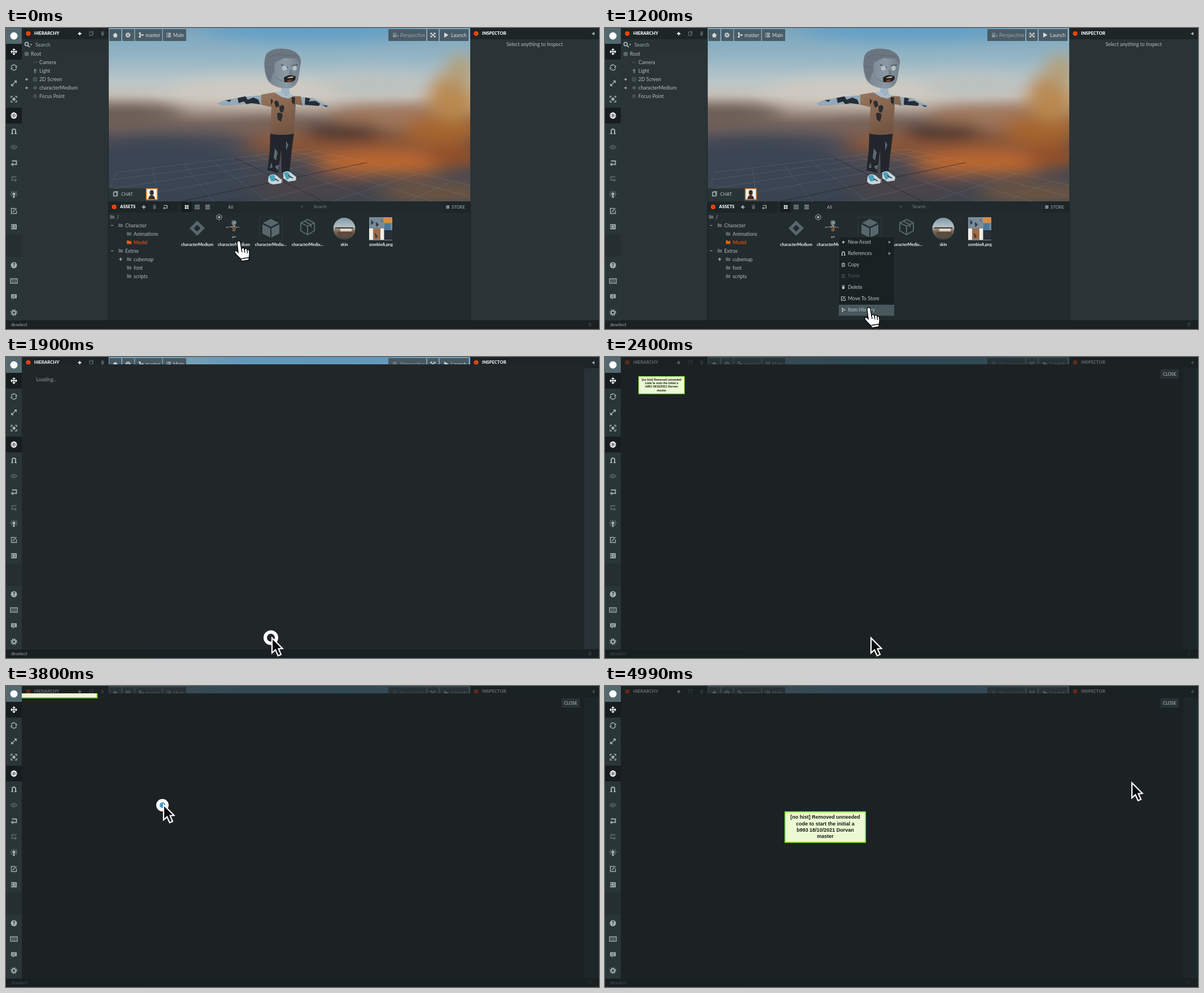
Recreate the animation shown at these times as an HTML page. Size 1050x533 px, loop 5090 ms.

```html
<!DOCTYPE html>
<html lang="en">
<head>
<meta charset="utf-8">
<title>Editor item history</title>
<style>
  html, body { margin: 0; width: 100%; height: 100%; overflow: hidden; background: #1b2224; }
  svg { display: block; width: 100%; height: 100%; }
  text { font-family: Lato, "Open Sans", sans-serif; }
  .node text { font: bold 9px "Liberation Sans", Arial, sans-serif; }
  .icon { fill: none; stroke: currentColor; stroke-width: 1.4; }
  .solid { fill: currentColor; stroke: none; }
</style>
</head>
<body>
<svg id="stage" viewBox="0 0 1050 533"></svg>
<script>
const LOOP = 5090;
const LIGHT = '#a3afb2', DIM = '#59666a', WHITE = '#f2f5f5', ORANGE = '#ff5a0a';

const rect = (x, y, w, h, fill, extra = '') =>
  `<rect x="${x}" y="${y}" width="${w}" height="${h}" fill="${fill}" ${extra}/>`;
const path = (d, fill, extra = '') => `<path d="${d}" fill="${fill}" ${extra}/>`;
const ellipse = (x, y, rx, ry, fill, extra = '') =>
  `<ellipse cx="${x}" cy="${y}" rx="${rx}" ry="${ry}" fill="${fill}" ${extra}/>`;
const text = (x, y, s, { fill = LIGHT, size = 8.8, weight = 400, anchor = 'start' } = {}) =>
  `<text x="${x}" y="${y + size * 0.35}" fill="${fill}" font-size="${size}" font-weight="${weight}" text-anchor="${anchor}">${s}</text>`;
const group = (id, body, extra = '') => `<g id="${id}" ${extra}>${body}</g>`;

// Icons are centred on 0,0 in a box of about 12 units.
const ICONS = {
  move: '<path d="M-5 0H5M0-5V5" /><path class="solid" d="M-6 0l3-3v6zM6 0l-3-3v6zM0-6l3 3h-6zM0 6l3-3h-6z"/>',
  refresh: '<path d="M-4.5-1A4.6 4.6 0 0 1 4-2.5M4.5 1A4.6 4.6 0 0 1-4 2.5"/><path class="solid" d="M5.5-4v4H1.8zM-5.5 4V0h3.7z"/>',
  resize: '<path d="M-4 4L4-4"/><path class="solid" d="M5-5v5L0-5zM-5 5V0l5 5z"/>',
  frame: '<path d="M-5-2v-3h3M2-5h3v3M5 2v3H2M-2 5h-3V2"/><rect class="solid" x="-2.5" y="-2.5" width="5" height="5"/>',
  globe: '<circle r="4.8"/><ellipse rx="2.2" ry="4.8"/><path d="M-5 0H5M-4-2.6H4M-4 2.6H4" stroke-width=".9"/>',
  magnet: '<path d="M-3 5V-1A3 3 0 0 1 3-1V5" stroke-width="2"/><path d="M-5 4h4M1 4h4"/>',
  eye: '<path d="M-5.5 0Q0-6.5 5.5 0Q0 6.5-5.5 0z"/><circle class="solid" r="1.7"/>',
  undo: '<path d="M-3.5-3.5h8v6h-6" stroke-width="1.8"/><path class="solid" d="M-5.5 2.5l4-3.2v6.4z"/>',
  redo: '<path d="M4.5-3.5h-8v6h5" stroke-width="1.8"/><path class="solid" d="M5.5 2.5l-4-3.2v6.4z"/>',
  bulb: '<circle class="solid" cy="-1" r="2.7"/><path class="solid" d="M-1.5 2h3v4h-3z"/><path d="M-6-1h1.7M4.3-1H6M-4.5-5l1 1M4.5-5l-1 1M0-6v1.2M-4.5 3l1-1M4.5 3l-1-1"/>',
  light: '<circle class="solid" cy="-1.5" r="3"/><path class="solid" d="M-1.5 1h3v4h-3z"/>',
  edit: '<path d="M2-4.5h-6.5v9h9V-1M-2 2l6.5-7"/>',
  outbox: '<path class="solid" d="M-5-4.5H5v2.2H-5zM-5 2.3H5v2.2H-5zM3-3h2v6H3zM-5-1h4v-2l4 3-4 3V1h-4z"/>',
  help: '<circle class="solid" r="5.5"/><text y="3.2" text-anchor="middle" font-size="9" font-weight="900" fill="#263033" stroke="none">?</text>',
  keyboard: '<rect x="-6" y="-4" width="12" height="8"/><path d="M-4-1.5H4M-4 1.5H4" stroke-dasharray="1.4 .8"/>',
  chat: '<path class="solid" d="M-5-4.5H5v7H0L-2 5V2.5h-3z"/><path d="M-3-2H3M-3 .5H2" stroke="#263033" stroke-width=".8"/>',
  gear: '<circle r="3" stroke-width="2"/><circle r="5" stroke-width="1.7" stroke-dasharray="2 1.93"/>',
  plus: '<path d="M-3.3 0H3.3M0-3.3V3.3" stroke-width="2"/>',
  minus: '<path d="M-2.6 0H2.6"/>',
  copy: '<rect x="-3" y="-3" width="5" height="6"/><path d="M-1-4h4.5v6" stroke-width=".8"/>',
  trash: '<path class="solid" d="M-3-2h6l-.5 6h-5zM-3.7-4h7.4v1.2h-7.4zM-1.2-5h2.4v1h-2.4z"/>',
  search: '<circle cx="-1" cy="-1" r="3" stroke-width="1.8"/><path d="M1 1l3.5 3.5" stroke-width="2"/>',
  home: '<path class="solid" d="M-4.5 .2L0-4 4.5 .2H3V4H-3V.2z"/>',
  branch: '<path d="M-2-3v6M-2 0h4" /><path class="solid" d="M-3.7-4.5h3.4v2.5h-3.4zM-3.7 2h3.4v2.5h-3.4zM1.5-1.3h3v2.6h-3z"/>',
  list: '<path d="M-1.5-3H4M-1.5 0H4M-1.5 3H4M-4-3h1.4M-4 0h1.4M-4 3h1.4"/>',
  play: '<path class="solid" d="M-3-4.5L4.5 0-3 4.5z"/>',
  camera: '<path class="solid" d="M-5-1h6v5h-6zM1.5 1.5L5-.5v4zM-4.5-4h2.4v2.3h-2.4zM-1-4h2.4v2.3H-1z"/>',
  expand: '<path class="solid" d="M-4.5-4h3.5l-3.5 3.5zM4.5-4H1l3.5 3.5zM-4.5 4H-1L-4.5 .5zM4.5 4H1L4.5 .5z"/><path d="M-3.5-3l7 6M3.5-3l-7 6"/>',
  folder: '<path class="solid" d="M-4-3.2h3l1 1h4V3h-8z"/>',
  tiles: '<path class="solid" d="M-3.3-3.3h2.9v2.9h-2.9zM.4-3.3h2.9v2.9H.4zM-3.3 .4h2.9v2.9h-2.9zM.4 .4h2.9v2.9H.4z"/>',
  dots: '<path d="M-4-3H4M-4 0H4M-4 3H4" stroke-width="1.9" stroke-dasharray="2 1"/>',
  rows: '<path d="M-4-3H4M-4 0H4M-4 3H4"/>',
  diamond: '<path d="M0-3.2L3.2 0 0 3.2-3.2 0z"/>',
  code: '<path d="M-1.5-2L-3.5 0-1.5 2M1.5-2L3.5 0 1.5 2" stroke-width=".9"/>',
  screen: '<path d="M-4-4h8v8h-8zM-2-2h4v4h-4z" stroke-width=".8"/>',
  target: '<circle r="3.8" stroke-width=".8"/><circle r="1.5" stroke-width=".8"/>',
  hexagon: '<path d="M0-4.6l4 2.3v4.6l-4 2.3-4-2.3v-4.6z" stroke-width=".9"/><circle class="solid" r="2"/>',
  clip: '<path d="M-3-3h6v7h-6zM-1.5-4h3"/><path d="M0-1v4M-1.5 1h3" stroke-width=".9"/>'
};
const icon = (name, x, y, color = LIGHT, scale = 1) =>
  `<g class="icon" color="${color}" transform="translate(${x} ${y}) scale(${scale})">${ICONS[name]}</g>`;
const dot = (x, y) => `<circle cx="${x}" cy="${y}" r="4" fill="#ff4a05"/><circle cx="${x}" cy="${y}" r="1" fill="#7b2100"/>`;
const heading = (x, y, s) => dot(x - 10.5, y) + text(x, y, s, { size: 7.7, weight: 900, fill: WHITE });

function backdrop() {
  const blobs = [
    [540, 0, 190, 20, '#619fc7'], [450, 112, 160, 22, '#cfcac1'], [650, 100, 90, 18, '#bcc1be'],
    [205, 152, 110, 17, '#65564f'], [480, 176, 90, 14, '#7c6457'],
    [700, 158, 130, 20, '#a1775a'], [610, 206, 190, 24, '#8d5637'], [775, 180, 70, 26, '#a5652f'],
    [790, 122, 42, 44, '#b9884f'], [806, 78, 24, 34, '#b39c74'], [600, 184, 70, 15, '#45332f'],
    [670, 240, 125, 20, '#bd672d'], [795, 226, 50, 22, '#93502b'], [765, 292, 110, 20, '#6d5443'],
    [540, 284, 110, 24, '#484448'], [270, 250, 150, 50, '#3b4552']
  ];
  return rect(181, 0, 641, 307, 'url(#sky)') +
    `<g filter="url(#soft)">${blobs.map(b => ellipse(...b)).join('')}</g>`;
}

function floorGrid() {
  const project = (u, v) => {
    const depth = 1 + 0.364 * u + 0.5 * v;
    return `${(502 + (203 * u - 130 * v - 15) / depth).toFixed(1)} ${(150 + 120 / depth).toFixed(1)}`;
  };
  let pale = '', axes = '';
  for (let i = -4; i <= 4; i++) {
    const k = i / 4;
    const lines = `M${project(k, -1)}L${project(k, 1)}M${project(-1, k)}L${project(1, k)}`;
    if (i) pale += lines; else axes = lines;
  }
  return path(pale, 'none', 'stroke="#a5b2bc" stroke-opacity=".2" stroke-width=".8"') +
    path(axes, 'none', 'stroke="#191f25" stroke-opacity=".6"');
}

function figure() {
  const skin = '#94a9b9', ink = '#262c34';
  return path('M488 103h13l2 18-16-3z', '#9fb4c3') +
    path('M452 119L420 122 390 127 374 133 381 138 398 137 422 135 452 136z', skin) +
    path('M521 122l23 2 14 7 15 6-3 4-17-4-31 1z', skin) +
    path('M410 124l14-3 4 6 10-4 9 4 3 8-16-2-8 2-5-5-9 3zM389 128l10-1-3 4zM530 123l9 2-3 5 12-1 8 5-2 4-25-2zM560 136l10 2-3 2z', ink) +
    path('M468 184l42 1-5 40-3 29-14 2-1-40-5 41-19-5 4-35z', '#22262c') +
    path('M476 213l5 7-3 15-4-5zM496 200l4 7-4 10zM484 242l-3 10-5-7zM470 238l2 9-5 1z', '#5d6a75') +
    path('M452 118l23-4 25 6 22 1 3 16-12-2-3 52c-14 3-30 3-42 0l2-47-18-4z', 'url(#shirt)') +
    path('M475 114l13-1 8 7 7-4 7 4-10 5-12-3z', '#a9bdca') +
    path('M475 132q3-6 7-2l2 8-6 3zM484 139q7-6 9 2l-3 9-5-2zM480 151q7-3 10 3l-3 12-6-4zM506 122l6 1-1 13-5-4zM469 125l4 4-4 8z', '#2b2c2f') +
    path('M459 52C462 38 480 35 495 37 512 39 523 48 522 62L518 88C516 101 508 108 494 107 478 106 466 99 462 90 457 77 456 63 459 52z', 'url(#face)') +
    path('M459 52C462 38 480 35 495 37 512 39 523 48 522 64L515 55 493 53 476 61 475 78 471 85 468 95C459 86 456 63 459 52z', '#6a7580') +
    path('M464 53l13-6 36 3M460 68l9 2M476 85q12 14 36 11', 'none', 'stroke="#4f5b65" stroke-opacity=".6"') +
    path('M487 65l12 5M506 67l11-2', 'none', 'stroke="#535d65" stroke-width="2"') +
    ellipse(493, 71, 4.4, 4.4, '#b4bfc5') + ellipse(511, 71, 3.8, 4.2, '#b4bfc5') +
    path('M502 74l4 0 2 8-6 0z', '#6f7d87') +
    path('M492 88q10-8 21-2l-1 6-5 3-14 1z', '#24201f') + path('M498 88q7-3 11-2l-1 2-9 1z', '#c4beae') +
    path('M497 93l8-2 2 2-7 2z', '#84452f') +
    path('M465 263q5-7 14-2l9 8-1 6-13 2q-9-1-10-6zM491 256q7-5 13 0l10 8-1 6-13 2-9-6z', '#c9d6da') +
    path('M466 263q4-5 9-2l3 9-8 2zM492 257q5-4 9 0l3 8-7 4z', '#45a2bb') +
    path('M476 267l7 4M500 261l8 5', 'none', 'stroke="#333b40" stroke-width="1.5"');
}

function viewport() {
  const button = (x, w, body) => rect(x, 2, w, 21, '#46565e', 'fill-opacity=".92"') + body;
  const label = { fill: '#d6dddf', size: 8.7 };
  return backdrop() + floorGrid() + figure() +
    path('M485 268h4v5h-4z', 'none', 'stroke="#d8dde0" stroke-width=".8"') +
    button(183, 21, icon('home', 193.5, 12.5, '#d6dddf')) +
    button(206, 21, icon('gear', 216, 12.5, '#d6dddf', .8)) +
    button(228.5, 48, icon('branch', 239, 12.5, '#d6dddf') + text(247, 12.5, 'master', label)) +
    button(278, 41, icon('list', 288, 12.5, '#d6dddf') + text(296, 12.5, 'Main', label)) +
    button(677, 67, icon('camera', 690, 12.5, '#859398') + text(698, 12.5, 'Perspective', { ...label, fill: '#98a5aa' })) +
    button(746, 20, icon('expand', 756, 12.5, '#d6dddf')) +
    button(768, 51, icon('play', 779, 12.5, '#d6dddf') + text(788, 12.5, 'Launch', label)) +
    rect(182, 284, 65, 23, '#293437') + icon('copy', 194, 294, LIGHT, 1.15) + text(204, 294, 'CHAT', { size: 7.8, fill: '#c1cacc' }) +
    rect(248.7, 284.7, 19, 19, '#f5f1e9', 'stroke="#f38a25" stroke-width="1.5"') +
    ellipse(258, 291.5, 3.6, 4.5, '#34302f') + path('M252 303q1-7 6-7t6 7z', '#34302f');
}

function toolbar() {
  const items = [['move', 42], ['refresh', 70], ['resize', 98], ['frame', 126], ['globe', 155], ['magnet', 183],
    ['eye', 211], ['undo', 239], ['redo', 267], ['bulb', 295], ['edit', 324], ['outbox', 352],
    ['help', 420], ['keyboard', 448], ['chat', 476], ['gear', 504]];
  const active = ['move', 'globe'], off = ['eye', 'redo'];
  return rect(0, 0, 28, 518, '#2a3538') + rect(0, 366, 28, 39, '#252e31') + rect(0, 0, 28, 28, '#53696f') +
    '<circle cx="14" cy="14" r="6.5" fill="#fff"/>' +
    items.map(([name, y]) => (active.includes(name) ? rect(0, y - 14, 28, 28, '#171d1f') : '') +
      icon(name, 14, y, active.includes(name) ? '#fff' : off.includes(name) ? DIM : LIGHT)).join('');
}

function hierarchy() {
  const rows = [['code', 'Camera'], ['light', 'Light'], ['screen', '2D Screen', 1], ['diamond', 'characterMedium', 1], ['target', 'Focus Point']];
  return rect(28, 0, 153, 518, '#2a3437') + rect(28, 0, 153, 20, '#1d2527') + rect(28, 20, 153, 18, '#283235') +
    heading(50, 9.7, 'HIERARCHY') + icon('plus', 130.5, 10, WHITE, .9) + icon('copy', 151, 10, DIM) + icon('trash', 171, 10, DIM, .8) +
    icon('search', 37.5, 29.5, LIGHT) + path('M42.5 28.5h4l-2 2.5z', LIGHT) + text(52, 29.5, 'Search', { size: 9 }) +
    ellipse(36.5, 46, 4, 4, '#5a686c') + text(44, 46, 'Root', { fill: '#b3bdbf' }) +
    rows.map(([name, label, open], i) => {
      const y = 61 + i * 15;
      return icon(name, 51.5, y, '#6c7b7f', .8) + text(59, y, label, { fill: '#b3bdbf' }) + (open ? icon('plus', 36.5, y, LIGHT, .7) : '');
    }).join('');
}

function inspector() {
  return rect(822, 0, 228, 518, '#2a3437') + rect(822, 0, 228, 20, '#1d2527') + heading(843, 9.7, 'INSPECTOR') +
    path('M1042 7v6l-5-3z', LIGHT) + text(936, 28.5, 'Select anything to Inspect', { anchor: 'middle', fill: '#b3bdbf' });
}

function assets() {
  const tree = [['/', 188, 335], ['Character', 203, 350, 'minus'], ['Animations', 218, 365], ['Model', 218, 380],
    ['Extras', 203, 395, 'minus'], ['cubemap', 218, 410, 'plus'], ['font', 218, 425], ['scripts', 218, 440]];
  const names = ['characterMedium', 'characterMedium', 'characterMediu...', 'characterMediu...', 'skin', 'zombieA.png'];
  const tone = '#58676b';
  const art =
    path('M338.5 341l13.5 13.5-13.5 13.5-13.5-13.5zM338.5 348.5l-6 6 6 6 6-6z', tone, 'fill-rule="evenodd"') +
    `<g transform="translate(341 336) scale(.128)">${figure()}</g>` +
    rect(448.5, 335, 41, 41, 'none', 'stroke="#3a4649" stroke-dasharray="2 1.5"') +
    path('M469 338l14 7-14 7-14-7zM454 347.5l14 7V371l-14-7zM484 347.5l-14 7V371l14-7z', tone) +
    path('M534 339l12 6v14l-12 7-12-7V345zM522 345l12 6 12-6M534 351v15M528 342l12 6v5', 'none', `stroke="${tone}" stroke-width="2"`) +
    `<circle cx="599" cy="355.5" r="19.5" fill="url(#ball)"/>` + path('M583 353h32v2h-32z', '#3d3937') +
    rect(592, 355, 20, 5, '#d9d6ca') + path('M587 361h27v7q-14 8-27 0z', '#5c4a3d') +
    rect(643, 335, 41, 41, '#798c99') + rect(669, 335, 15, 10, '#d78c45') + rect(643, 355, 26, 20, '#f0eee7') +
    rect(650, 355, 13, 20, '#9a6d4d') + rect(670, 358, 14, 17, '#292f36') + rect(670, 346, 11, 12, '#4c789b') +
    path('M647 340l4 5-4 3zM655 344l5 4-4 4zM664 339l3 5M653 363l5 6-3 3zM674 361l4 6', '#34404c', 'stroke="#34404c"');
  return rect(181, 307, 641, 211, '#222b2d') + rect(181, 307, 641, 20, '#1d2527') + rect(304, 307, 472, 20, '#20292b') +
    heading(202, 316.7, 'ASSETS') + icon('plus', 244, 317, LIGHT) + icon('trash', 263, 317, DIM, .85) + icon('undo', 282, 317, LIGHT, .75) +
    rect(310, 308, 19, 18, '#171d1f') + icon('tiles', 320, 317, WHITE) + icon('dots', 338.5, 317) + icon('rows', 357, 317) +
    text(393, 316.7, 'All', { size: 8 }) + path('M522 315.5h4l-2 3z', DIM) + text(544.5, 316.7, 'Search', { size: 7.9, fill: '#78868a' }) +
    icon('outbox', 782, 317, LIGHT, .6) + text(789, 317, 'STORE', { size: 7.7 }) +
    tree.map(([label, x, y, sign], i) => icon('folder', x, y - .5, i === 3 ? ORANGE : DIM) +
      text(x + 8, y - .5, label, { fill: i === 3 ? ORANGE : '#b3bdbf' }) +
      (sign ? icon(sign, x - 15, y - .5, LIGHT, .8) : '')).join('') +
    icon('hexagon', 377.5, 335, LIGHT, 1.1) + art +
    names.map((s, i) => text(338.5 + i * 65.1, 383.5, s, { anchor: 'middle', fill: WHITE, size: 7.25, weight: 700 })).join('');
}

function menu() {
  const rows = [['plus', 'New Asset'], ['magnet', 'References'], ['clip', 'Copy'], ['clip', 'Paste'],
    ['trash', 'Delete'], ['edit', 'Move To Store'], ['branch', 'Item History']];
  return rect(414, 370, 98, 139, '#1a2123', 'stroke="#293336" stroke-width=".7"') +
    rect(414, 370, 98, 19.5, '#48585d', 'id="hover"') +
    rows.map(([name, label], i) => {
      const y = 379.2 + i * 20, fill = i === 3 ? '#4c575a' : '#bdc6c8';
      return icon(name, 422, y, fill, .75) + text(430, y, label, { fill }) + (i < 2 ? path(`M502 ${y - 2.5}v5l4-2.5z`, '#8d999c') : '');
    }).join('');
}

function node() {
  const lines = ['[no hist] Removed unneeded', 'code to start the initial a', 'b993 18/10/2021 Dorvan', 'master'];
  return rect(.8, .8, 142.4, 54, '#ecf9d5', 'stroke="#80e52b" stroke-width="1.8"') +
    lines.map((s, i) => `<text x="72" y="${13.4 + i * 11.25}" text-anchor="middle" fill="#15190f">${s}</text>`).join('');
}

const defs = `<defs>
  <linearGradient id="sky" x2="0" y2="1">
    ${['0 #78a5be', '.17 #95b5c4', '.3 #b9c6c9', '.39 #cac5bd', '.46 #b09f93', '.55 #756660', '.65 #4d4d57', '1 #38434f']
      .map(s => s.split(' ')).map(([o, c]) => `<stop offset="${o}" stop-color="${c}"/>`).join('')}
  </linearGradient>
  <linearGradient id="face"><stop stop-color="#75828c"/><stop offset=".6" stop-color="#8b99a4"/><stop offset="1" stop-color="#717f89"/></linearGradient>
  <linearGradient id="shirt" x2=".4" y2="1"><stop offset=".1" stop-color="#95735a"/><stop offset="1" stop-color="#735543"/></linearGradient>
  <linearGradient id="ball" x2="0" y2="1"><stop stop-color="#7c98a8"/><stop offset=".4" stop-color="#b4bfc1"/><stop offset=".62" stop-color="#806553"/><stop offset="1" stop-color="#32404a"/></linearGradient>
  <filter id="soft" x="-20%" y="-30%" width="140%" height="160%"><feGaussianBlur stdDeviation="17 13"/></filter>
  <clipPath id="view"><rect x="181" width="641" height="307"/></clipPath>
  <clipPath id="modal"><rect x="28" y="13" width="996" height="505"/></clipPath>
</defs>`;

const hand = path('M-3 2C-3-2 2-2 3 1L5 13C7 10 10 11 10 14 13 11 15 13 15 15 18 13 19 16 19 19 20 24 18 27 18 33L5 35 4 31C0 28-4 24-7 20-8 16-4 15-1 19z', '#fff', 'stroke="#080a0a" stroke-width="1.5"') +
  path('M5 30.5L18 28.5M5 13l1 6M10 14l1 6M15 15l.5 6', 'none', 'stroke="#080a0a" stroke-width="1.3"');
const arrow = path('M1 1.5V28L7.2 22.6 11.8 33 17 30.7 12.5 20.6 19.5 20z', '#080b0c', 'stroke="#fff" stroke-width="2.2"');

document.getElementById('stage').innerHTML = defs +
  rect(0, 0, 1050, 533, '#1a2123') + `<g clip-path="url(#view)">${viewport()}</g>` +
  hierarchy() + inspector() + assets() +
  text(9, 525, 'deselect', { size: 7.8 }) + text(1031.5, 525, '0', { size: 7.8, fill: DIM }) +
  path('M181.5 0V518M822.5 307V518M0 518H1050', 'none', 'stroke="#171e20" stroke-width=".8"') +
  group('dim', rect(28, 0, 1022, 533, '#181f21') + rect(0, 518, 28, 15, '#181f21')) + toolbar() +
  group('panel', rect(28, 13, 996, 505, '#212729', 'id="sheet"') + group('loading', text(53.5, 40, 'Loading...', { fill: '#939b9d' })) +
    group('history', `<g class="node" clip-path="url(#modal)"><g id="node">${node()}</g></g>` +
      rect(983.5, 22, 32.5, 16, '#293336') + text(999.7, 30, 'CLOSE', { size: 7.7, fill: '#bcc5c7', anchor: 'middle' }))) +
  group('menu', menu()) + '<circle id="ring" fill-opacity=".9"/>' + group('hand', hand) + group('arrow', arrow);

// Held values: each row is [time, ...values] and lasts until the next row.
const held = (rows, t) => rows.findLast(row => row[0] <= t).slice(1);

const POINTER = [[0, 412, 378], [890, 415, 382], [1000, 430, 420], [1100, 457, 478], [1200, 467, 496],
  [1900, 470, 496], [2900, 452, 470], [3000, 391, 398], [3100, 248, 282], [3200, 193, 207], [3300, 180, 145],
  [3700, 230, 161], [3800, 278, 209], [3900, 390, 320], [4000, 490, 409], [4100, 530, 430],
  [4690, 590, 400], [4790, 745, 300], [4890, 885, 205], [4990, 932, 170]];
const NODE = [[0, 59.3, 34, .568], [3400, 36, 12, .7], [3500, 0, -22, .86], [3600, -32, -50, 1],
  [3800, 18, -34, 1], [3900, 66, 14, 1], [4000, 178, 120, 1], [4100, 278, 205, 1], [4200, 318, 222, 1]];
// radius, line width, line colour, fill, offset from the pointer
const RING = [[0, 0], [500, 10, 6, '#fff', '#2c84c4', 0, -4], [600, 16, 6, '#c9cfd0', '#1f62aa', 0, -6],
  [700, 21.5, 5, '#949c9b', '#174e94', 0, -8], [800, 0], [1800, 8, 6, '#fff', '#49a6dc', 0, 1],
  [1900, 10, 6, '#fff', 'none', -1, 1], [2000, 0], [3700, 8, 6, '#fff', '#49a6dc', -1, 2], [4200, 11, 4, '#aeb4b5', 'none', -1, 2], [4300, 0]];
const DIMMING = [[0, 0], [1900, .06], [2000, .35], [2100, .68]];

const el = id => document.getElementById(id);
const show = (id, on) => el(id).setAttribute('visibility', on ? 'inherit' : 'hidden');
const place = (id, x, y, s = 1) => el(id).setAttribute('transform', `translate(${x} ${y}) scale(${s})`);

function draw(now) {
  const t = now % LOOP;
  const [x, y] = held(POINTER, t);
  const open = t >= 1900;
  place('hand', x, y);
  place('arrow', x, y);
  show('hand', !open);
  show('arrow', open);
  show('menu', t >= 600 && !open);
  show('panel', open);
  show('loading', t < 2400);
  show('history', t >= 2400);
  show('hover', t >= 890 && !open);
  el('hover').setAttribute('y', 370 + 20 * Math.max(0, Math.floor((y - 369.5) / 20)));
  el('dim').setAttribute('opacity', held(DIMMING, t)[0]);
  el('sheet').setAttribute('fill', t < 2000 ? '#212729' : '#1c2224');
  place('node', ...held(NODE, t));

  const [r, width = 0, stroke = 'none', fill = 'none', dx = 0, dy = 0] = held(RING, t);
  const attrs = { cx: x + dx, cy: y + dy, r, fill, stroke, 'stroke-width': width };
  for (const key in attrs) el('ring').setAttribute(key, attrs[key]);
}

function tick() {
  draw(performance.now());
  requestAnimationFrame(tick);
}
tick();
</script>
</body>
</html>
```
